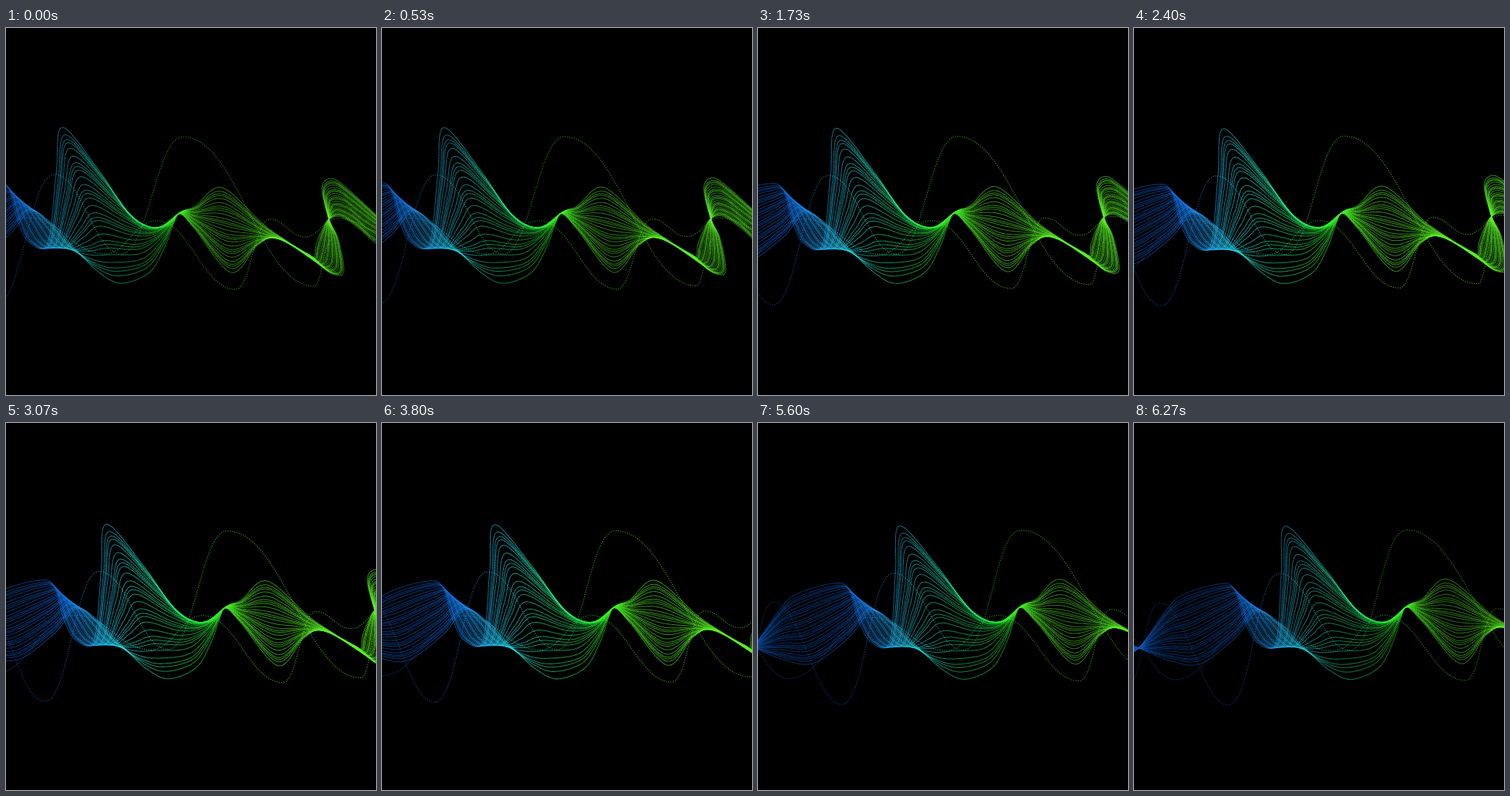
Write an HTML page with a canvas that moves like this. It is 480 px wide and 476 px high and loops after 6.34 s.

```html
<!DOCTYPE html>
<html>
<head>
<meta charset="utf-8">
<style>
html, body { margin: 0; width: 100%; height: 100%; background: #000; overflow: hidden; }
canvas { display: block; width: 480px; height: 476px; }
</style>
</head>
<body>
<canvas id="stage" width="480" height="476"></canvas>
<script>
const ctx = document.getElementById('stage').getContext('2d');
const LOOP = 6340, STEP = 200 / 3, LINES = 29;
const LEFT = -150, RIGHT = 500;

// Key points of the ribbon's two outer lines: [ax, ay, bx, by]
const hump = [
  [-150, 292, -150, 264], [-124, 278, -124, 278], [-84, 228, -85, 296],
  [-62, 211, -45, 302], [-17, 200, 2, 270], [3, 207, 32, 238],
  [15, 250, 60, 254], [30, 278, 78, 274]];
const sail = [
  [54, 279, 93, 290], [65, 190, 122, 318], [73, 129, 150, 331],
  [120, 184, 186, 317], [160, 241, 206, 284], [195, 259, 217, 255]];
const fan = [
  [228, 238, 226, 241], [246, 231, 246, 262], [280, 207, 292, 317],
  [333, 254, 326, 282], [368, 279, 350, 272], [404, 305, 390, 292]];
const tail = [
  [424, 319, 400, 297], [438, 316, 402, 282], [431, 274, 410, 262], [419, 248, 419, 248],
  [410, 208, 435, 245], [421, 195, 458, 260], [440, 206, 480, 279], [485, 247, 500, 284]];
const ribbon = [...hump, ...sail, ...fan, ...tail];

// Peaks and troughs of the two loose dotted waves
const waves = [
  [[-140, 325], [-95, 221], [-11, 357], [62, 190], [150, 293], [229, 141], [400, 335], [422, 275]],
  [[-150, 255], [-78, 321], [30, 246], [128, 293], [195, 250], [298, 339], [342, 248],
   [388, 271], [430, 247], [500, 268]]];

const clamp = v => Math.max(0, Math.min(1, v));
const smooth = v => { v = clamp(v); return v * v * (3 - 2 * v); };

const tint = ctx.createLinearGradient(LEFT, 0, RIGHT, 0);
for (let u = 0; u <= 1; u += 1 / 32) {
  const x = LEFT + u * (RIGHT - LEFT);
  const hue = 215 - 110 * smooth((x + 10) / 280);
  const light = 40 + 14 * smooth((x + 60) / 120);
  tint.addColorStop(u, `hsl(${hue}, 87%, ${light}%)`);
}

// Catmull-Rom curve through the points
function spline(p) {
  const path = new Path2D(), last = p.length - 1;
  const at = i => p[Math.max(0, Math.min(last, i))];
  const handle = (i, dir) => [0, 1].map(c => p[i][c] + dir * (at(i + 1)[c] - at(i - 1)[c]) / 6);
  path.moveTo(...p[0]);
  for (let i = 0; i < last; i++) {
    path.bezierCurveTo(...handle(i, 1), ...handle(i + 1, -1), ...p[i + 1]);
  }
  return path;
}

// Curve that is level at every point
function swing(p) {
  const path = new Path2D();
  path.moveTo(...p[0]);
  for (let i = 1; i < p.length; i++) {
    const [x0, y0] = p[i - 1], [x1, y1] = p[i], pull = 0.42 * (x1 - x0);
    path.bezierCurveTo(x0 + pull, y0, x1 - pull, y1, x1, y1);
  }
  return path;
}

const strands = Array.from({ length: LINES }, (_, i) => {
  const even = i / (LINES - 1);
  const k = even + 0.012 * Math.sin(even * Math.PI * 12);
  return spline(ribbon.map(([ax, ay, bx, by]) => [ax + (bx - ax) * k, ay + (by - ay) * k]));
});
const dotted = waves.map(swing);

function stroke(paths, width, alpha, dash) {
  ctx.lineWidth = width;
  ctx.globalAlpha = alpha;
  ctx.setLineDash(dash);
  for (const p of paths) ctx.stroke(p);
}

function draw(t) {
  const u = t / (LOOP - STEP);
  const shift = 124 * u - 12 * Math.sin(Math.PI * u) * (0.76 - u);
  const p = shift / 124, turn = 0.045 * p;
  const glow = 0.85 + 0.2 * Math.sin(Math.PI * u);
  ctx.setTransform(1, 0, 0, 1, 0, 0);
  ctx.globalAlpha = 1;
  ctx.fillStyle = '#000';
  ctx.fillRect(0, 0, 480, 476);

  // Slide right while tilting slightly
  ctx.setTransform(1, -turn, turn, 1, shift - turn * 140, 8.2 * p);
  ctx.strokeStyle = tint;
  stroke(strands, 1.05, 0.66 * glow, [1.7, 0.4]);
  stroke(dotted, 1.1, 0.62 * glow, [1.3, 1.7]);
}

const start = performance.now();
function tick() {
  const t = (performance.now() - start) % LOOP;
  draw(Math.floor(t / STEP) * STEP);
  requestAnimationFrame(tick);
}
tick();
</script>
</body>
</html>
```
